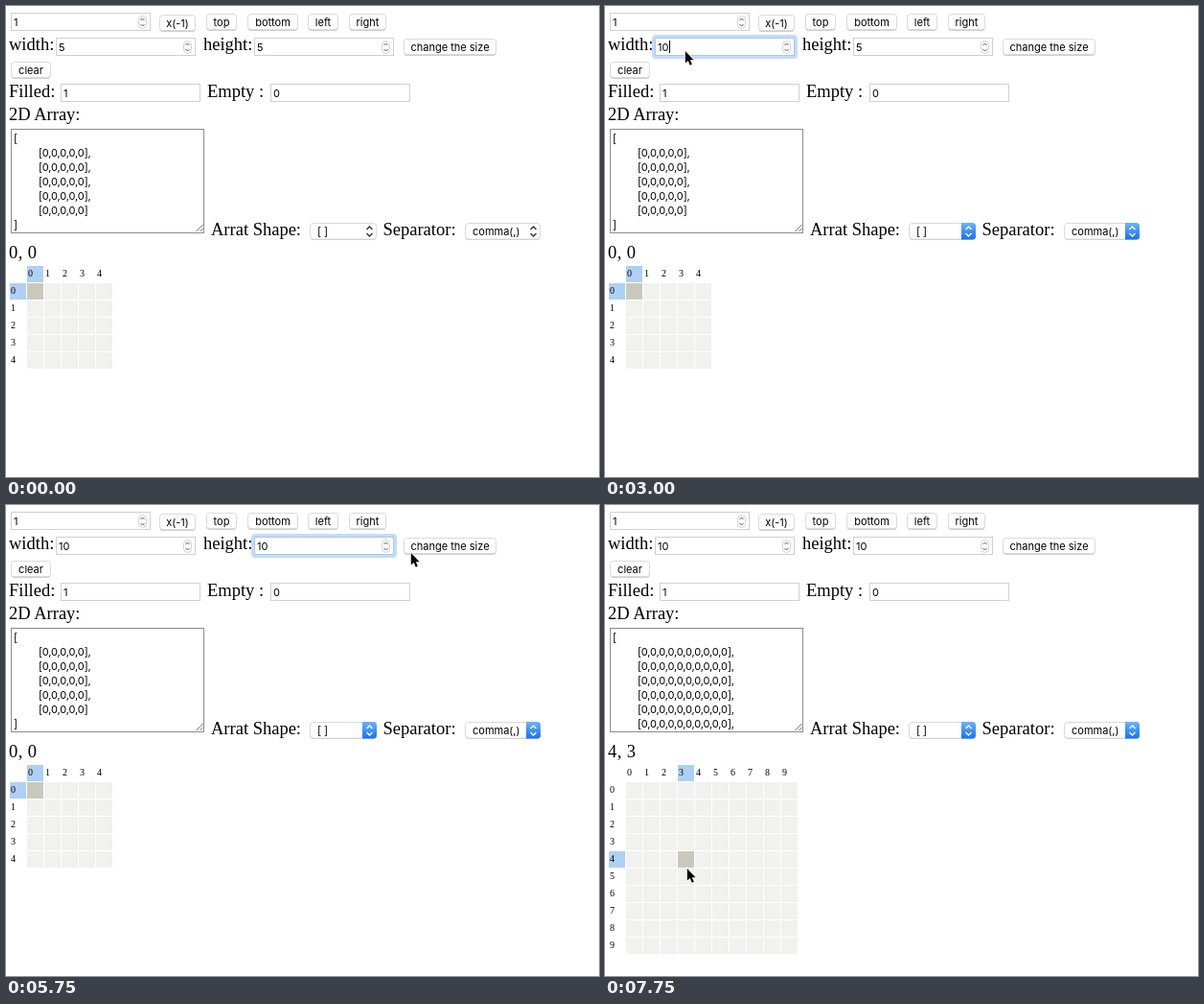
These frames come from a looping animation (619x491 px, 8000 ms). An HTML page:

```html
<!DOCTYPE html>
<html lang="en">
<head>
<meta charset="utf-8">
<title>2D array editor</title>
<style>
html, body { margin: 0; width: 100%; height: 100%; overflow: hidden; background: #fff; }
svg { display: block; }
text { white-space: pre; fill: #000; }
.ui { font: 11px Inter, "Open Sans", sans-serif; }
.num { letter-spacing: -.15px; }
.label { font: 18.5px "Liberation Serif", "Noto Serif", serif; }
.pos { letter-spacing: .4px; }
.head { font: 10px "Liberation Serif", "Noto Serif", serif; }
</style>
</head>
<body>
<svg id="stage" width="619" height="491" viewBox="0 0 619 491">
  <defs>
    <linearGradient id="blue" x1="0" y1="0" x2="0" y2="1">
      <stop offset="0" stop-color="#6cb3fa"/><stop offset="1" stop-color="#1672f5"/>
    </linearGradient>
  </defs>
  <g id="view"></g>
</svg>
<script>
const LOOP = 8000, STEP = 250, PITCH = 18, CELL = 17;

// Each track lists [start time, value]; a value holds until the next one.
const cursorTrack = [[0, null], [250, [287, 31]], [500, [126, 57]], [750, [83, 46]],
  [4750, [235, 45]], [5000, [355, 61]], [5250, [402, 52]], [5500, [415, 50]],
  [5750, [422, 49]], [7000, [323, 141]], [7250, [148, 307]], [7500, [97, 358]], [7750, [85, 378]]];
const focusTrack = [[0, ''], [1750, 'width'], [3250, 'height'], [6000, '']];
const widthTrack = [[0, '5'], [3000, '10']];
const heightTrack = [[0, '5'], [4000, '1'], [4250, '10']];
const selectTrack = [[0, ''], [1750, 'width'], [3000, ''], [3250, 'height'], [4000, '']];
const caretTrack = [[0, 0], [3000, 67.5], [3250, 0], [4000, 269.5], [4250, 275.5],
  [4750, 0], [5250, 275.5], [5750, 0]];
const cellTrack = [[0, [0, 0]], [7250, [0, 7]], [7500, [3, 4]], [7750, [4, 3]]];

const at = (track, t) => track.filter(([start]) => start <= t).pop()[1];
const range = n => [...Array(n).keys()];

const text = (cls, x, y, s, more = '') => `<text class="${cls}" x="${x}" y="${y}" ${more}>${s}</text>`;
const rect = (x, y, w, h, fill, more = '') =>
  `<rect x="${x}" y="${y}" width="${w}" height="${h}" fill="${fill}" ${more}/>`;
const line = (d, color, width = 1) =>
  `<path d="${d}" fill="none" stroke="${color}" stroke-width="${width}"/>`;
const chevrons = (x, y, w, gap, color, width) =>
  line(`M${x - w} ${y - gap}l${w} ${-w}l${w} ${w}M${x - w} ${y + gap}l${w} ${w}l${w} ${-w}`, color, width);

function input(x, y, value, { spin = false, focused = false, selected = false } = {}) {
  let s = '';
  if (focused) {
    s += rect(x - 1, y - 1, 148, 21, 'none', 'rx="2" stroke="#c3dcfb" stroke-width="4"');
  }
  s += rect(x + .5, y + .5, 145, 18, '#fff', `stroke="${focused ? '#a5c8f3' : '#d0d0d0'}"`);
  if (selected) s += rect(x + 3, y + 3, 7.5, 13, '#b3d5fe');
  s += text('ui', x + 3, y + 14, value);
  if (spin) {
    s += rect(x + 133.5, y + 3.5, 8, 13, '#fff', 'rx="4" stroke="#d2d2d2"');
    s += chevrons(x + 137.5, y + 10, 2, 2, '#555', 1);
  }
  return s;
}

function button(x, y, w, label) {
  return rect(x + .5, y + 1, w - 1, 17, '#cfcfcf', 'rx="3"')
    + rect(x + .5, y + .5, w - 1, 16, '#fff', 'rx="3" stroke="#dadada"')
    + text('ui', x + w / 2, y + 12.5, label, 'text-anchor="middle"');
}

function select(x, w, label, active) {
  const right = x + w;
  return rect(x + .5, 227, w - 1, 17, '#cfcfcf', 'rx="3.5"')
    + rect(x + .5, 226.5, w - 1, 16.5, '#fff', 'rx="3.5" stroke="#dadada"')
    + (active ? `<path d="M${right - 15} 226h11.5q3.5 0 3.5 3.5v10.5q0 3.5 -3.5 3.5h-11.5z" fill="url(#blue)"/>` : '')
    + text('ui', x + 8, 239, label)
    + chevrons(right - 7.5, 235, 3, 2, active ? '#fff' : '#333', 1.4);
}

function textarea(size) {
  const row = '[' + Array(size).fill(0).join() + ']';
  const lines = ['[', ...range(size).map(i => row + (i < size - 1 ? ',' : '')), ']'];
  return rect(5.5, 128.5, 201, 108, '#fff', 'stroke="#8c8c8c"')
    + lines.slice(0, 7).map((s, i) =>
      text('ui num', s.length > 1 ? 34 : 8, (s.length > 1 ? 142 : 142) + 15 * i, s)).join('')
    + line('M198.5 235l7 -7M202.5 235l3 -3', '#666');
}

function grid(size, [row, col]) {
  const blue = '#afd0f5';
  const place = i => i * PITCH;
  let s = rect(22 + place(col), 271, CELL, CELL, blue) + rect(4, 289 + place(row), CELL, CELL, blue);
  for (const i of range(size)) {
    s += text('head', 23 + place(i), 282, i);
    s += text('head', 5, 300 + place(i), i);
    for (const j of range(size)) {
      const here = i === row && j === col;
      s += rect(22 + place(j), 289 + place(i), CELL, CELL, here ? '#c8c8bc' : '#f1f1f0');
    }
  }
  return s;
}

const pointer = ([x, y]) => `<path transform="translate(${x + .8} ${y + 1}) scale(.88)"
  d="M0 0V14.3L3.3 11.3L5.6 16.7L8 15.7L5.7 10.4H10Z" stroke="#fff" paint-order="stroke" stroke-width="2"/>`;

const labels = [[3, 46, 'width:'], [206, 46, 'height:'], [3, 95, 'Filled:'], [210, 95, 'Empty :'],
  [3, 119, '2D Array:'], [214, 239, 'Arrat Shape:'], [393.5, 239, 'Separator:']];
const buttons = [[160, 9, 38, 'x(-1)'], [209, 8, 32, 'top'], [252, 8, 53, 'bottom'], [315, 8, 32, 'left'],
  [358, 8, 39, 'right'], [415, 34, 97, 'change the size'], [5, 58, 42, 'clear']];

function draw(t) {
  const focus = at(focusTrack, t), selected = at(selectTrack, t);
  const caret = at(caretTrack, t), cursor = at(cursorTrack, t), cell = at(cellTrack, t);
  const size = t < 6000 ? 5 : 10, active = t >= 1500;
  const field = (name, x, track) => input(x, 33, at(track, t),
    { spin: true, focused: focus === name, selected: selected === name });

  return input(5, 7, '1', { spin: true })
    + field('width', 52, widthTrack)
    + field('height', 259, heightTrack)
    + input(57, 81, '1') + input(276, 81, '0')
    + labels.map(l => text('label', ...l)).join('')
    + buttons.map(b => button(...b)).join('')
    + textarea(size)
    + select(317, 70, '[ ]', active) + select(479, 79, 'comma(,)', active)
    + text('label pos', 3, 263, cell.join(', '))
    + grid(size, cell)
    + (caret ? line(`M${caret} 36v13`, '#000') : '')
    + (cursor ? pointer(cursor) : '');
}

const view = document.getElementById('view');
const start = performance.now();
let shown = -1;
function tick() {
  const t = (performance.now() - start) % LOOP;
  const step = Math.floor(t / STEP);
  if (step !== shown) {
    shown = step;
    view.innerHTML = draw(step * STEP);
  }
  requestAnimationFrame(tick);
}
tick();
</script>
</body>
</html>
```
